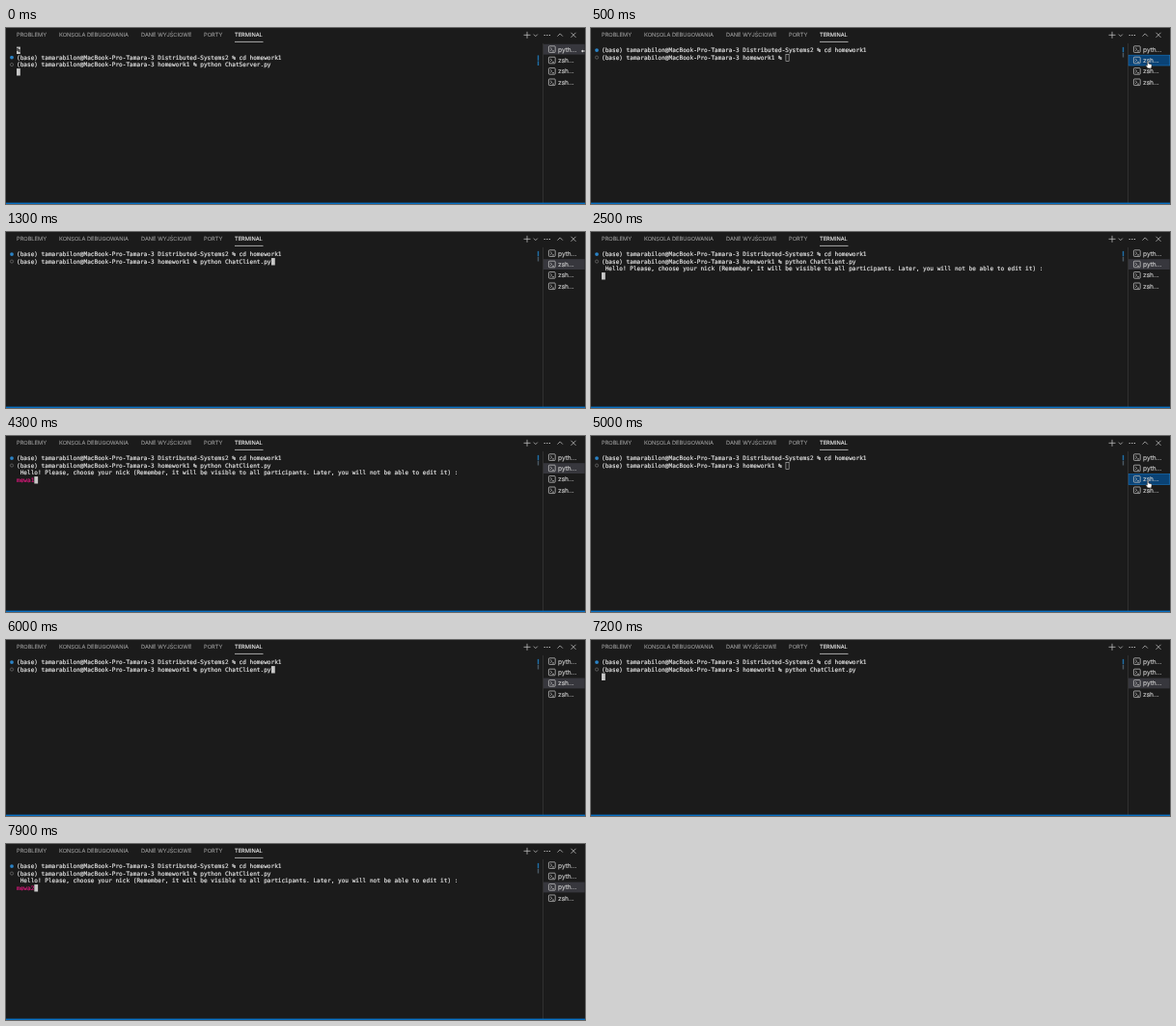
Recreate the animation shown at these times as an HTML page. Size 600 by 183 pixels, loop 8000 ms.

```html
<!DOCTYPE html>
<html lang="pl">
<head>
<meta charset="utf-8">
<title>Terminal</title>
<style>
  html, body { margin: 0; height: 100%; overflow: hidden; background: #1b1b1b; }
  svg { display: block; width: 100vw; height: 100vh; }
  text { white-space: pre; text-rendering: geometricPrecision; fill: currentColor; stroke: currentColor; stroke-width: .12; }
  .tab { font: 5.7px Inter, sans-serif; color: #929292; }
  .tab.on { color: #e7e7e7; }
  .mono { font: 6.09px "DejaVu Sans Mono", monospace; color: #e2e2e2; stroke-width: .18; }
  .item { font: 6.6px Inter, sans-serif; color: #d0d0d0; }
  .icon { fill: none; stroke: #c5c5c5; stroke-width: .75; }
</style>
</head>
<body>
<svg viewBox="0 0 600 183">
  <rect width="600" height="183" fill="#1b1b1b"/>
  <g id="tabs"></g>
  <path d="M237 14.4h29.5" stroke="#e7e7e7" stroke-width=".7"/>
  <g class="icon">
    <path d="M536.5 7.3h7M540 3.8v7M546.8 6.6l2 2 2-2M571.5 8.6l2.7-2.7 2.7 2.7M585.5 4.8l5 5m0-5l-5 5"/>
    <path d="M557.6 7.5h1.2m1.4 0h1.2m1.4 0h1.2" stroke-width="1.1"/>
  </g>
  <g id="screen"></g>
  <path d="M556.5 16v166" stroke="#414141" stroke-width=".6"/>
  <rect y="181.6" width="600" height="1.4" fill="#0870c4"/>
  <g id="pointer"></g>
</svg>
<script>
const LOOP = 8000, STEP = 100;
const LEFT = 11, CHAR = 3.666, LINE = 7.5, ROW = 11.4;
const HOST = "(base) tamarabilon@MacBook-Pro-Tamara-3 ";
const CD = HOST + "Distributed-Systems2 % cd homework1";
const PROMPT = HOST + "homework1 % ";
const HELLO = " Hello! Please, choose your nick (Remember, it will be visible to all participants. Later, you will not be able to edit it) :";
const $ = id => document.getElementById(id);

const tabs = [[11, "PROBLEMY"], [55, "KONSOLA DEBUGOWANIA"], [140, "DANE WYJŚCIOWE"], [205, "PORTY"], [237, "TERMINAL"]];
$("tabs").innerHTML = tabs.map(([x, s]) =>
  `<text class="tab${s == "TERMINAL" ? " on" : ""}" x="${x}" y="9.4">${s}</text>`).join("");

// Pointer trips: start, end, one position per step; the last one holds.
const trips = [
  [0, 1000, [[598, 24], [595, 26], [588, 29], [581, 33], [578, 36], [578, 38], [520, 50], [390, 62], [327, 69]]],
  [3100, 3600, [[488, 43], [420, 72], [367, 89]]],
  [4400, 5600, [[370, 90], [400, 96], [470, 92], [550, 70], [577, 53], [578, 50], [578, 50], [480, 84], [340, 96], [275, 91]]],
];

function pointerAt(t) {
  const trip = trips.find(([from, to]) => t >= from && t < to);
  return trip && trip[2][Math.min((t - trip[0]) / STEP, trip[2].length - 1)];
}

// Latest value from a list of [time, value].
const latest = (t, list) => list.reduce((v, [at, next]) => t >= at ? next : v, list[0][1]);

const mono = (line, s, color = "") =>
  `<text class="mono" x="${LEFT}" y="${25.3 + line * LINE}" style="color:${color}">${s}</text>`;

function block(line, col, hollow) {
  const x = LEFT + col * CHAR, y = 19.6 + line * LINE;
  return hollow
    ? `<rect x="${x + .3}" y="${y + .3}" width="3.2" height="6.9" fill="none" stroke="#c4c4c4" stroke-width=".6"/>`
    : `<rect x="${x}" y="${y}" width="3.8" height="7.4" fill="#c8c8c8"/>`;
}

// Command marks in the gutter and on the overview ruler.
function marks(line) {
  const y = 23.1 + line * LINE;
  return `<circle cx="6" cy="${y}" r="1.9" fill="#2b83c6"/>
    <circle cx="6" cy="${y + LINE}" r="1.6" fill="none" stroke="#7d7d7d" stroke-width=".6"/>
    <rect x="550.8" y="${y - 3.2 + line}" width="1.4" height="5.4" fill="#1f6fa8"/>
    <rect x="550.8" y="${y + 2.8 + line}" width="1.4" height="4.6" fill="${line ? "#1f6fa8" : "#4b5a66"}"/>`;
}

function server() {
  return marks(1) + block(0, 0) + mono(0, "%", "#1b1b1b") +
    mono(1, CD) + mono(2, PROMPT + "python ChatServer.py") + block(3, 0);
}

function client({ focus, typed, running, hello, nick }) {
  const command = typed ? "python ChatClient.py" : "";
  const cursor = running ? block(hello ? 3 : 2, nick.length)
    : block(1, PROMPT.length + command.length, !focus);
  return marks(0) + mono(0, CD) + mono(1, PROMPT + command) +
    (hello ? mono(2, HELLO) + mono(3, nick, "#d8187a") : "") + cursor;
}

function terminal(t) {
  if (t < 500) return server();
  if (t < 5000) return client({
    focus: t >= 1000, typed: t >= 1300, running: t >= 2500, hello: t >= 2500,
    nick: "mewa1".slice(0, latest(t, [[0, 0], [3600, 1], [3700, 2], [3800, 3], [3900, 4], [4100, 5]])),
  });
  return client({
    focus: t >= 5600, typed: t >= 6000, running: t >= 7200, hello: t >= 7300,
    nick: "mewa2".slice(0, latest(t, [[0, 0], [7600, 1], [7700, 2], [7800, 4], [7900, 5]])),
  });
}

function sessions(t, pos) {
  const active = latest(t, [[0, 0], [500, 1], [5000, 2]]);
  const focused = t >= 500 && t < 800 || t >= 5000 && t < 5300;
  const hover = pos && pos[0] > 557 ? Math.floor((pos[1] - 16.5) / ROW) : -1;
  return [0, 2500, 7200, LOOP].map((start, i) => {
    const y = 22.2 + i * ROW, top = y - ROW / 2;
    const fill = i == active ? (focused ? "#0a4376" : "#37373d") : i == hover ? "#2a2d2e" : "none";
    const edge = i == active && focused ? "#1478c8" : "none";
    return `<rect x="557" y="${top + .3}" width="42.7" height="${ROW - .6}" fill="${fill}" stroke="${edge}" stroke-width=".6"/>
      <rect class="icon" x="562.4" y="${y - 3.4}" width="6.8" height="6.6" rx=".8"/>
      <path class="icon" d="M564 ${y - 1.7}l1.7 1.6-1.7 1.6M566 ${y + 1.7}h2"/>
      <text class="item" x="572" y="${y + 2.3}">${t >= start ? "pyth" : "zsh"}...</text>`;
  }).join("");
}

function pointer(pos) {
  if (!pos) return "";
  const [x, y] = pos;
  const shape = x < 556
    ? `<path d="M-1.6-3.8q1.6 0 1.6 1v5.6q0 1-1.6 1M1.6-3.8q-1.6 0-1.6 1M0 2.8q0 1 1.6 1" fill="none" stroke="#ddd" stroke-width=".7"/>`
    : x > 592
    ? `<path d="M-2.2 0l2-2v1.3h2V.7h-2V2z" fill="#fff" stroke="#111" stroke-width=".4"/>`
    : `<path d="M-1.6.2V-3.3q.7-.9 1.4 0V-.9l2.6.6q.9.3.8 1.2l-.6 3h-3.6l-2.2-3q0-1 1.6.2z" fill="#fff" stroke="#111" stroke-width=".5"/>`;
  return `<g transform="translate(${x} ${y})">${shape}</g>`;
}

function draw(now) {
  const t = Math.floor(now % LOOP / STEP) * STEP;
  if (t !== draw.last) {
    const pos = pointerAt(t);
    $("screen").innerHTML = terminal(t) + sessions(t, pos);
    $("pointer").innerHTML = pointer(pos);
    draw.last = t;
  }
  requestAnimationFrame(draw);
}
draw(0);
</script>
</body>
</html>
```
